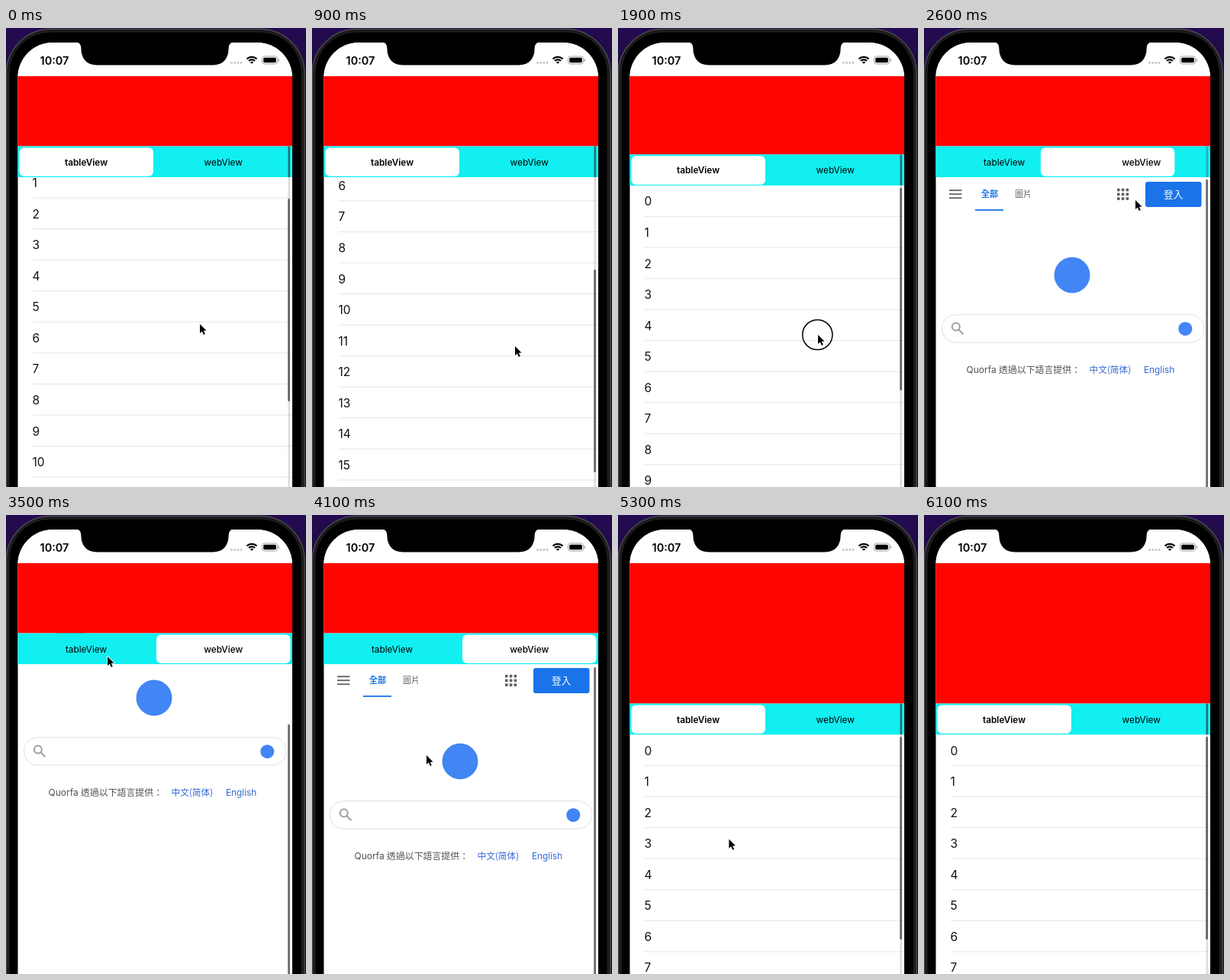
An HTML page with a canvas for the animation above (6.2 s loop, 393x600 px).

```html
<!DOCTYPE html>
<html lang="zh-Hant">
<head>
<meta charset="utf-8">
<title>Sticky header</title>
<style>
html, body { margin: 0; width: 100%; height: 100%; overflow: hidden; background: #000; }
canvas { display: block; width: 393px; height: 600px; }
</style>
</head>
<body>
<canvas id="stage" width="393" height="600"></canvas>
<script>
const ctx = document.getElementById('stage').getContext('2d');
const LOOP = 6200, LEFT = 15.3, RIGHT = 375, WIDTH = RIGHT - LEFT;
const TOP = 63, HEADER = 183.5, COLLAPSE = 92, TAB_H = 40.5, ROW_H = 40.55;
const LATIN = 'Inter, "Noto Sans CJK TC", "Noto Sans CJK", sans-serif';
const HAN = '"Noto Sans CJK TC", "Noto Sans CJK", sans-serif';
const DARK = 'rgba(60,60,65,.75)';

const TO_WEB = 2400, TO_TABLE = 4900, SLIDE = 297, HOLD = 270, TAP = 80;
const START_SCROLL = 146;
const SWIPES = [
  { at: 100, time: 750, by: 199 },
  { at: 950, time: 550, by: -345 },
  { at: 1700, time: 306, by: 92 },
  { at: 2800, time: 600, by: 84 },
  { at: 3700, time: 450, by: -84 },
  { at: 4350, time: 250, by: -92 },
];
// Key points of the pointer's path: time, x, y
const PATH = [
  [0, 254, 387], [900, 266, 416], [1600, 264, 500], [1900, 262, 401],
  [2350, 285, 180], [2600, 277, 225], [2850, 228, 420], [3500, 133, 185],
  [3950, 150, 400], [4300, 150, 184], [4600, 150, 272], [4900, 106, 268], [5800, 200, 640],
];

const clamp = p => Math.max(0, Math.min(1, p));
const smooth = p => (p = clamp(p)) * p * (3 - 2 * p);
const glide = p => 1 - (1 - clamp(p)) ** 2;

const scrollAt = t => SWIPES.reduce((sum, s) => sum + s.by * glide((t - s.at) / s.time), START_SCROLL);

const heldAt = t => SWIPES.some(s => t >= s.at && t < s.at + HOLD)
  || [TO_WEB, TO_TABLE].some(at => Math.abs(t - at) < TAP);

function pointerAt(t) {
  const next = PATH.findIndex(k => k[0] > t);
  if (next < 0) return PATH.at(-1).slice(1);
  const [t0, x0, y0] = PATH[next - 1], [t1, x1, y1] = PATH[next];
  const p = smooth((t - t0) / (t1 - t0));
  return [x0 + (x1 - x0) * p, y0 + (y1 - y0) * p];
}

function rect(x, y, w, h, color) {
  ctx.fillStyle = color;
  ctx.fillRect(x, y, w, h);
}

function round(x, y, w, h, r, fill, stroke, width = 1) {
  ctx.beginPath();
  ctx.roundRect(x, y, w, h, r);
  if (fill) { ctx.fillStyle = fill; ctx.fill(); }
  if (stroke) line(stroke, width);
}

function line(color, width) {
  ctx.strokeStyle = color;
  ctx.lineWidth = width;
  ctx.stroke();
}

function dot(x, y, r, color) {
  ctx.beginPath();
  ctx.arc(x, y, r, 0, 7);
  ctx.fillStyle = color;
  ctx.fill();
}

function text(str, x, y, size, color, weight = 400, align = 'left', family = LATIN) {
  ctx.font = `${weight} ${size}px ${family}`;
  ctx.textAlign = align;
  ctx.fillStyle = color;
  ctx.fillText(str, x, y + size * 0.36);
}

function drawPhone() {
  const glow = ctx.createLinearGradient(0, 0, 0, 110);
  glow.addColorStop(0, '#240a52');
  glow.addColorStop(1, '#17102a');
  rect(0, 0, 393, 600, glow);
  round(0.5, 1.5, 390.5, 700, 58, '#19191b', '#4a4a4d', 1.5);
  round(4, 5, 383.5, 700, 54, '#000', '#29292c');
}

function drawNotch() {
  ctx.beginPath();
  ctx.moveTo(91, 18);
  ctx.quadraticCurveTo(98.4, 19, 98.4, 27);
  ctx.bezierCurveTo(98.4, 40, 106, 48.5, 119, 48.5);
  ctx.lineTo(271, 48.5);
  ctx.bezierCurveTo(284, 48.5, 291.6, 40, 291.6, 27);
  ctx.quadraticCurveTo(291.6, 19, 299, 18);
  ctx.fillStyle = '#000';
  ctx.fill();
}

function drawStatus() {
  rect(LEFT, 19, WIDTH, TOP - 19, '#fff');
  drawNotch();
  text('10:07', 63.5, 42.3, 14.5, '#000', 600, 'center');
  for (let i = 0; i < 4; i++) dot(295.5 + i * 4.2, 45.5, 1.4, '#c4c4c6');

  for (const r of [1.8, 5.6, 9.2]) {
    ctx.beginPath();
    ctx.arc(322, 47, r, -Math.PI * 0.75, -Math.PI * 0.25);
    line('#000', 2.3);
  }

  round(335.5, 37, 20, 10, 3, null, '#a3a3a5');
  round(337.2, 38.7, 16.6, 6.6, 1.6, '#000');
  round(356.6, 40.3, 1.4, 3.6, 0.7, '#a3a3a5');
}

function drawTable(top, offset) {
  const first = Math.floor(offset / ROW_H);
  for (let i = first; i < first + 12; i++) {
    const y = top - offset + i * ROW_H;
    text(i, 34.5, y + 21, 15.5, '#111');
    rect(34.5, y + ROW_H - 0.5, RIGHT - 34.5, 1, '#e5e5e7');
  }
}

function drawWeb(top) {
  const nav = top + 22.3, note = top + 251.9;
  for (let i = -1; i < 2; i++) {
    rect(33, nav - 1 + i * 5, 16.5, 1.8, '#5f6368');
    for (let j = -1; j < 2; j++) round(258.7 + j * 5.8, nav - 1.8 + i * 5.8, 3.7, 3.7, 1, '#5f6368');
  }
  text('全部', 86, nav, 11, '#1a73e8', 700, 'center', HAN);
  text('圖片', 130, nav, 11, '#5f6368', 400, 'center', HAN);
  rect(67, top + 42, 37, 1.8, '#1a73e8');
  round(290, top + 6, 73.5, 33, 3, '#1a73e8');
  text('登入', 326.7, nav, 12.6, '#fff', 500, 'center', HAN);

  dot(194, top + 128, 23.5, '#4285f4');

  round(23.5, top + 179.8, 343.5, 36.3, 18.1, '#fff', '#dfe1e5');
  ctx.beginPath();
  ctx.arc(41.8, top + 195.5, 5, 0, 7);
  ctx.moveTo(45.5, top + 199.2);
  ctx.lineTo(51.5, top + 205.2);
  line('#9aa0a6', 2);
  dot(342.3, top + 198.2, 9, '#4285f4');

  text('Quorfa', 55.5, note, 12, '#4d5156');
  text('透過以下語言提供：', 98, note, 11.9, '#4d5156', 400, 'left', HAN);
  text('中文(简体)', 216.5, note, 11.7, '#3367d6', 400, 'left', HAN);
  text('English', 288, note, 11.8, '#3367d6');
}

function drawTabs(y, progress) {
  const web = progress > 0;
  rect(LEFT, y, WIDTH, TAB_H, '#12eff1');
  round(17.5 + 179.5 * progress, y + 2, 175.5, 37.3, 6, '#fff');
  text('tableView', 105, y + 20.8, 11.8, '#000', web ? 400 : 600, 'center');
  text('webView', 284.7, y + 20.8, 11.8, '#000', web ? 500 : 400, 'center');
}

function drawIndicators(tabs, top, offset, web) {
  if (!web || !offset) rect(369.5, tabs, 2.5, TAB_H, web ? 'rgba(60,60,65,.35)' : DARK);
  if (!web) rect(369.5, top, 2.5, 600, 'rgba(60,60,65,.18)');
  const travel = offset * (web ? 0.9 : 0.465);
  round(369.2, top + 3 + travel, 2.8, web ? 600 : 265, 1.4, DARK);
}

function drawPointer(x, y, held) {
  if (held) {
    ctx.beginPath();
    ctx.arc(x - 0.7, y, 19.6, 0, 7);
    line('rgba(255,255,255,.6)', 2.6);
    line('#000', 1.5);
  }
  ctx.save();
  ctx.translate(x, y);
  const arrow = new Path2D('M0 0V12L2.8 9.5L4.8 14L6.8 13.1L4.8 8.8L8.5 8.6Z');
  ctx.lineJoin = 'round';
  ctx.strokeStyle = '#fff';
  ctx.lineWidth = 1.8;
  ctx.stroke(arrow);
  ctx.fillStyle = '#000';
  ctx.fill(arrow);
  ctx.restore();
}

function draw(t) {
  const scroll = scrollAt(t);
  const tabs = TOP + HEADER - Math.min(scroll, COLLAPSE);
  const top = tabs + TAB_H;
  const offset = Math.max(0, scroll - COLLAPSE);
  const web = t >= TO_WEB && t < TO_TABLE;
  const progress = smooth((t - TO_WEB) / SLIDE) - smooth((t - TO_TABLE) / SLIDE);

  drawPhone();
  ctx.save();
  ctx.beginPath();
  ctx.roundRect(LEFT, 19, WIDTH, 700, 46);
  ctx.clip();
  rect(LEFT, 19, WIDTH, 600, '#fff');
  if (web) drawWeb(top - offset);
  else drawTable(top, offset);
  rect(LEFT, TOP, WIDTH, tabs - TOP, '#ff0400');
  drawTabs(tabs, progress);
  drawIndicators(tabs, top, offset, web);
  drawStatus();
  ctx.restore();
  drawPointer(...pointerAt(t), heldAt(t));
}

function tick() {
  draw(performance.now() % LOOP);
  requestAnimationFrame(tick);
}
tick();
</script>
</body>
</html>
```
